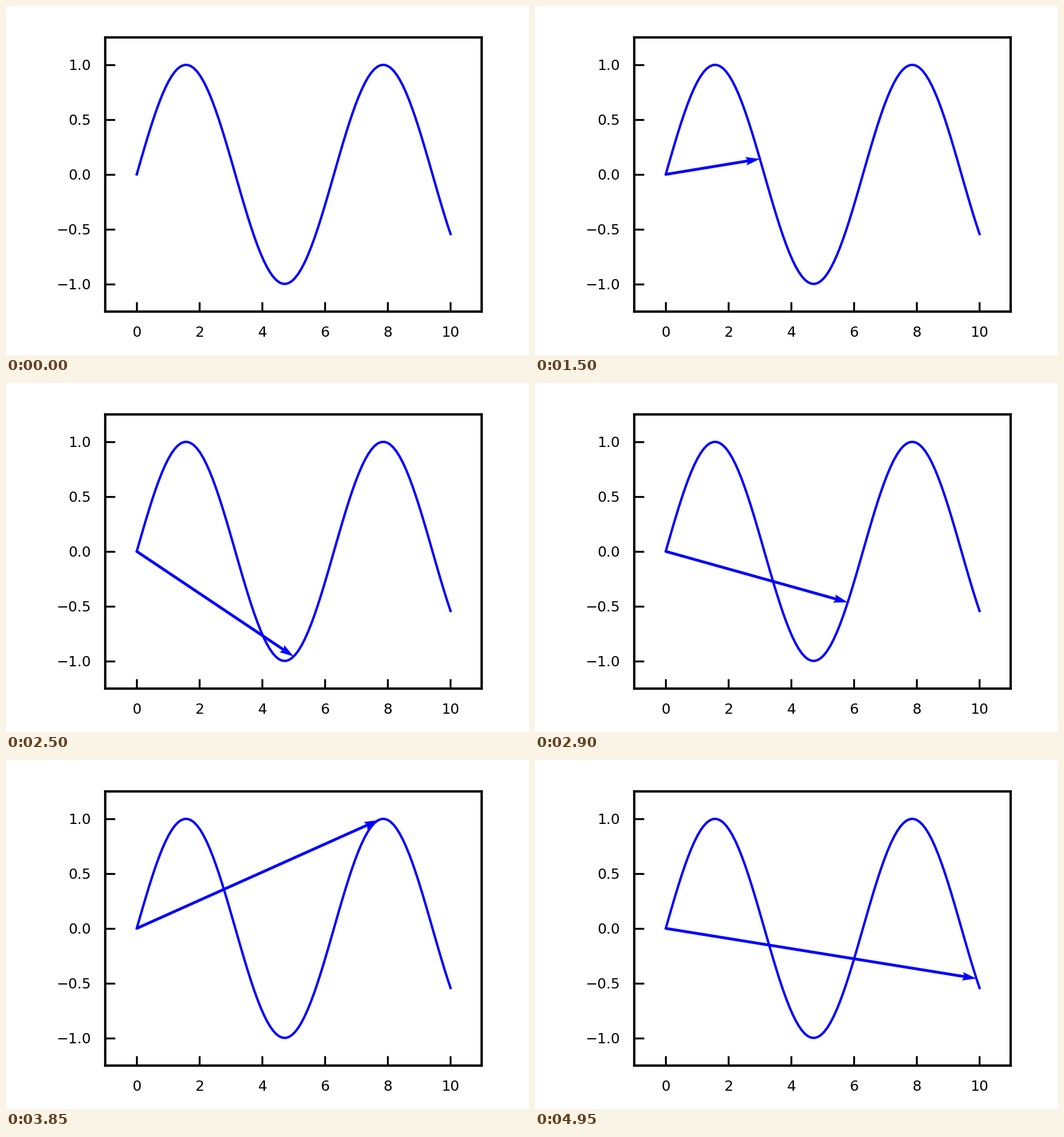
Recreate the animation shown at these times as a matplotlib script. Size 917x611 px, loop 5000 ms.

```python
import numpy as np
import matplotlib.pyplot as plt
from matplotlib.animation import FuncAnimation

FRAMES = 100
STEP = 0.1

plt.rcParams["font.family"] = "DejaVu Sans"

fig = plt.figure(figsize=(9.17, 6.11), dpi=100, facecolor="white")
ax = fig.add_axes([0.19, 0.125, 0.72, 0.785])
ax.set_xlim(-1, 11)
ax.set_ylim(-1.25, 1.25)
ax.set_xticks(np.arange(0, 11, 2))
ax.set_yticks(np.arange(-1, 1.1, 0.5))
ax.tick_params(direction="in", length=12, width=2.4, pad=18, labelsize=18)
for spine in ax.spines.values():
    spine.set_linewidth(3)

x = np.linspace(0, 10, 100)
ax.plot(x, np.sin(x), color="blue", linewidth=3)

# Arrow from the data origin to a point travelling along the curve
arrow = ax.quiver(0, 0, 0, 0, color="blue",
                  angles="xy", scale_units="xy", scale=1)


def update(i):
    t = i * STEP
    arrow.set_UVC(t, np.sin(t))
    return (arrow,)


anim = FuncAnimation(fig, update, frames=FRAMES, interval=50,
                     repeat=True, repeat_delay=0, blit=False)
plt.show()
```
